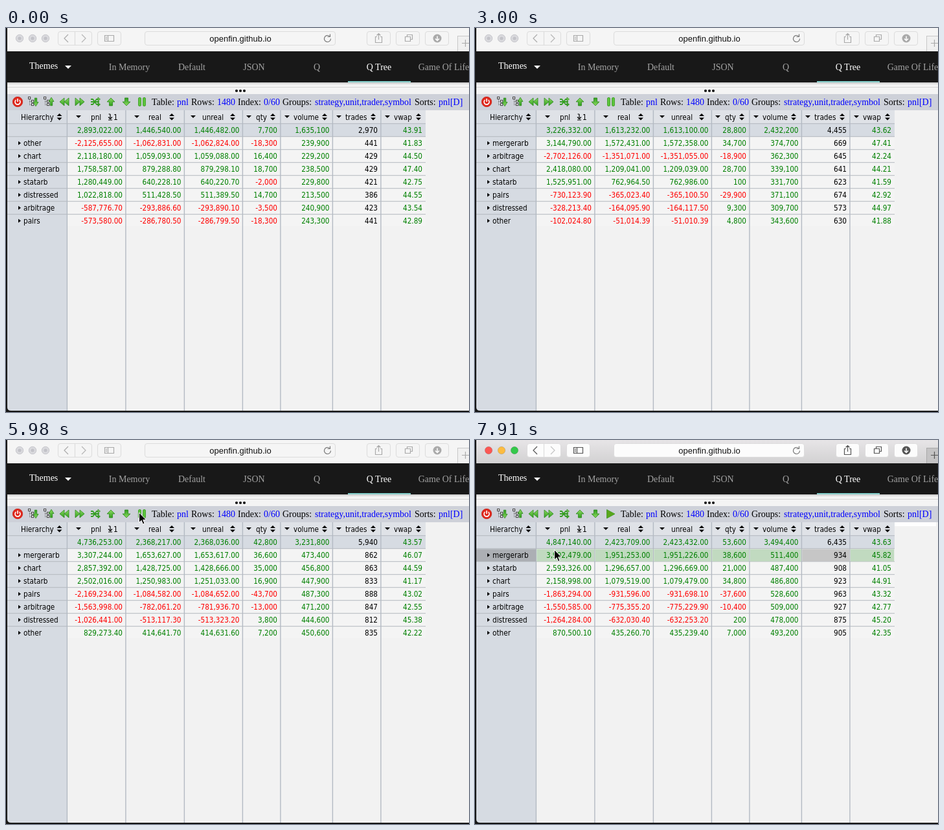
An HTML page that plays this animation: 715x593 px, repeating every 8 s.

```html
<!DOCTYPE html>
<html lang="en">
<head>
<meta charset="utf-8">
<style>
html, body { margin: 0; width: 715px; height: 593px; overflow: hidden; background: #f2f2f2; }
svg { display: block; }
.grid { font: 11.67px "DejaVu Sans Condensed", "Noto Sans", sans-serif; fill: #000; }
.serif { font: 14px "Liberation Serif", serif; }
.url { font: 13px "Liberation Sans", sans-serif; fill: #111; }
.end { text-anchor: end; }
.mid { text-anchor: middle; }
.line { fill: none; stroke-width: 1.2; }
</style>
</head>
<body>
<svg id="stage" width="715" height="593" viewBox="0 0 715 593">
  <defs>
    <linearGradient id="bar" x2="0" y2="1"><stop stop-color="#e7e5e7"/><stop offset="1" stop-color="#d2d1d2"/></linearGradient>
    <linearGradient id="leaf" x2="0" y2="1"><stop stop-color="#8edb63"/><stop offset="1" stop-color="#2f9d1d"/></linearGradient>
    <linearGradient id="shade" x2="0" y2="1"><stop stop-color="#c9c9c9"/><stop offset="1" stop-color="#f4f4f4"/></linearGradient>
  </defs>
  <g id="chrome"></g>
  <g id="page"></g>
  <g id="rows" class="grid"></g>
  <g id="control"></g>
  <g id="pointer"></g>
  <path d="M0 0H2V586Q2 591 8 591H715V593H0Z" fill="#161616"/>
</svg>
<script>
const LOOP = 8000;
const $ = id => document.getElementById(id);
const rect = (x, y, w, h, fill, more = '') =>
  `<rect x="${x}" y="${y}" width="${w}" height="${h}" fill="${fill}" ${more}/>`;
const path = (d, more = '') => `<path d="${d}" ${more}/>`;
const text = (x, y, s, more = '') => `<text x="${x}" y="${y}" ${more}>${s}</text>`;

const columns = [
  { name: 'pnl', left: 94.5, right: 185, menu: 112, label: 131 },
  { name: 'real', left: 185, right: 275.5, menu: 202, label: 220, sort: 256 },
  { name: 'unreal', left: 275.5, right: 365.5, menu: 289, label: 303, sort: 350 },
  { name: 'qty', left: 365.5, right: 424, menu: 375, label: 386, sort: 412 },
  { name: 'volume', left: 424, right: 504.5, menu: 434, label: 444, sort: 492 },
  { name: 'trades', left: 504.5, right: 579, menu: 514, label: 524, sort: 567 },
  { name: 'vwap', left: 579, right: 648, menu: 589, label: 599, sort: 637 },
];

// Per group: name, real, unreal, qty/100, volume/100, trades, vwap
function book(time, vwap, source) {
  const groups = source.trim().split('\n').map(row => {
    const [name, ...cells] = row.trim().split(' ');
    const [real, unreal, qty, volume, trades, price] = cells.map(Number);
    return { name, real, unreal, qty: qty * 100, volume: volume * 100, trades, vwap: price };
  });
  return { time, vwap, groups };
}

function between(time, a, b) {
  const mean = (p, q) => (p + q) / 2;
  const groups = a.groups.map(g => {
    const h = b.groups.find(other => other.name === g.name);
    const mixed = { name: g.name };
    for (const key of ['real', 'unreal', 'qty', 'volume', 'trades', 'vwap']) mixed[key] = mean(g[key], h[key]);
    return mixed;
  });
  return { time, vwap: mean(a.vwap, b.vwap), groups };
}

const first = book(0, 43.91, `
  other -1062831 -1062824 -183 2399 441 41.83
  chart 1059092.8 1059087.6 164 2292 429 44.5
  mergerarb 879288.8 879298.1 187 2385 429 47.4
  statarb 640228.1 640220.7 -20 2298 421 42.75
  distressed 511428.5 511389.5 147 2135 386 44.55
  arbitrage -293886.6 -293890.1 -35 2409 423 43.54
  pairs -286780.5 -286799.5 -183 2433 441 42.89`);
const second = book(1050, 43.7, `
  mergerarb 1208266 1208235 274 2886 517 47.46
  other -887916.7 -887913.7 -85 2779 504 41.24
  chart 868419.3 868423.4 229 2599 492 44.37
  statarb 643253.3 643249.7 -9 2635 484 42.4
  arbitrage -561362.3 -561365.9 -91 2793 490 42.18
  distressed 384058.4 384036.9 141 2433 444 45.08
  pairs -357584.1 -357613.3 -196 2938 534 43.22`);
const third = book(3000, 43.62, `
  mergerarb 1572431.3 1572358.3 347 3747 669 47.41
  arbitrage -1351071 -1351055 -189 3623 645 42.24
  chart 1209041 1209039 287 3391 641 44.21
  statarb 762964.5 762986 1 3317 623 41.59
  pairs -365023.4 -365100.5 -299 3711 674 42.92
  distressed -164095.9 -164117.5 93 3097 573 44.97
  other -51014.39 -51010.39 48 3436 630 41.88`);
const fourth = book(4940, 43.65, `
  mergerarb 1979346.3 1979300.3 375 4423 799 46.58
  chart 1315592.7 1315597.7 329 4179 788 44.28
  statarb 1012165 1012190 101 4149 770 41.29
  arbitrage -858757.6 -858623.1 -118 4310 773 42.61
  pairs -653825.1 -653911.3 -380 4540 828 42.96
  other 465641.26 465615.68 105 4151 770 42.42
  distressed -462363.2 -462395.4 64 3880 717 45.46`);
const fifth = book(5980, 43.57, `
  mergerarb 1653627 1653617 366 4734 862 46.07
  chart 1428725.4 1428666.3 350 4568 863 44.59
  statarb 1250983 1251033 169 4479 833 41.17
  pairs -1084582 -1084652 -437 4873 888 43.02
  arbitrage -782061.2 -781936.7 -130 4712 847 42.55
  distressed -513117.3 -513323.22 38 4446 812 45.38
  other 414641.73 414631.64 72 4506 835 42.22`);
const sixth = book(7020, 43.63, `
  mergerarb 1951253.3 1951225.6 386 5114 934 45.82
  statarb 1296657.2 1296669 210 4874 908 41.05
  chart 1079519 1079479 348 4868 923 44.91
  pairs -931596 -931698.1 -376 5286 963 43.32
  arbitrage -775355.2 -775229.9 -104 5090 927 42.77
  distressed -632030.4 -632253.2 2 4780 875 45.2
  other 435260.7 435239.4 70 4932 905 42.35`);
const books = [first, second, between(1950, second, third), third,
  between(4050, third, fourth), fourth, fifth, sixth];

const moves = [
  { time: 0 },
  { time: 4800, x: 711, y: 132 },
  { time: 4940, x: 173, y: 40 },
  { time: 5090, x: 97, y: 61 },
  { time: 5240, x: 124, y: 103 },
  { time: 5390, x: 184, y: 108 },
  { time: 5540, x: 187, y: 108 },
  { time: 5690, x: 198, y: 111 },
  { time: 5830, x: 203, y: 111 },
  { time: 5980, x: 205.5, y: 112 },
  { time: 6130, x: 204.5, y: 112.5, hand: true },
  { time: 6720, x: 202.5, y: 114.5, hand: true },
  { time: 6870, x: 200.5, y: 113.5, hand: true },
  { time: 7760, x: 176, y: 144 },
  { time: 7910, x: 122.5, y: 169.5 },
];
const at = (list, t) => list.findLast(item => item.time <= t);

function format(value, name) {
  const digits = ['qty', 'volume', 'trades'].includes(name) ? 0 : 2;
  const unit = name === 'qty' || name === 'volume' ? 100 : 1;
  const shown = digits ? Number(value.toPrecision(7)) : Math.round(value / unit) * unit;
  return shown.toLocaleString('en-US', { minimumFractionDigits: digits, maximumFractionDigits: digits });
}

const drawCells = (row, y) => columns.map(({ name, right }) => {
  const fill = name === 'trades' ? '#000' : row[name] < 0 ? '#f00' : '#008000';
  return text(right - 5, y, format(row[name], name), `class="end" fill="${fill}"`);
}).join('');

function drawRows(data, hover) {
  const groups = data.groups.map(g => ({ ...g, pnl: g.real + g.unreal }))
    .sort((a, b) => Math.abs(b.pnl) - Math.abs(a.pnl));
  const total = { vwap: data.vwap };
  for (const { name } of columns.slice(0, 6)) total[name] = groups.reduce((sum, g) => sum + g[name], 0);
  let out = '';
  if (hover) {
    out += rect(2, 168.5, 92, 19, '#acafb4');
    for (const { name, left, right } of columns)
      out += rect(left + .8, 168.5, right - left - 1.5, 19, name === 'trades' ? '#c6c6c6' : '#c1dac0');
  }
  out += drawCells(total, 162);
  groups.forEach((g, i) => {
    const y = 182 + i * 20;
    out += path(`M19 ${y - 7.2}L23 ${y - 4.2}L19 ${y - 1.2}Z`) + text(27, y, g.name) + drawCells(g, y);
  });
  return out;
}

function drawChrome(active) {
  const ink = active ? '#555' : '#aaa';
  const edge = active ? '#dddcdd' : '#dcdcdc';
  const button = (x, w) => rect(x + .5, 5.5, w, 21, active ? '#fcfcfc' : '#f5f5f5', `rx="3.5" stroke="${edge}"`);
  const icon = (d, color = ink) => path(d, `class="line" stroke="${color}"`);
  let out = rect(0, 0, 715, 36, active ? 'url(#bar)' : '#f5f5f5');
  ['#fc5753', '#fdbc40', '#34c84a'].forEach((color, i) => {
    const x = 21 + i * 20;
    out += `<circle cx="${x}" cy="16" r="5.7" fill="${active ? color : '#dadade'}" stroke="${active ? '#0002' : '#c6c6cb'}"/>`;
    if (!active) out += `<circle cx="${x}" cy="16" r="2.6" fill="#c2c2c8"/>`;
  });
  out += button(80, 52) + icon('M106.5 6V26', edge) + icon('M96 10L90 16L96 22')
    + icon('M117 10L123 16L117 22', active ? '#c4c4c4' : '#b5b5b5');
  out += button(141, 36) + icon('M152.5 11.5H166.5V20.5H152.5ZM157.5 11.5V20.5M154 14H156M154 16H156M154 18H156');
  out += button(214, 294) + text(362, 21, 'openfin.github.io', 'class="url mid"')
    + icon('M499.5 12.5A5 5 0 1 0 501.5 16.5M496.5 13.5H500.5V9.5', '#777');
  out += button(557, 36) + icon('M573 13.5H570.5V22.5H580.5V13.5H578M575.5 18V8.5M572.5 11.5L575.5 8.5L578.5 11.5');
  out += button(602, 36) + icon('M616.5 13.5H624.5V20.5H616.5ZM619.5 13V10.5H627.5V17.5H625');
  out += button(647, 36) + `<circle cx="666" cy="16" r="6.5" fill="${ink}"/>`
    + path('M666 12.5V19M663 16.5L666 19.5L669 16.5', 'fill="none" stroke="#fff" stroke-width="1.5"');
  out += rect(697.5, 12.5, 20, 24, active ? '#c4c3c4' : '#f0f0f0', `stroke="${active ? '#aaa' : '#c8c8c8'}"`)
    + icon('M704 23.5H715M709.5 18V29');
  return out;
}

function drawNav() {
  let out = rect(0, 36, 715, 48, '#181818') + rect(528, 82, 97, 2, '#86d0cc');
  out += text(36, 63, 'Themes', 'class="serif" fill="#fff"') + path('M91 58H101L96 63Z', 'fill="#fff"');
  const tabs = [['In Memory', 190.5], ['Default', 287], ['JSON', 383], ['Q', 480], ['Q Tree', 576], ['Game Of Life', 676]];
  for (const [name, x] of tabs)
    out += text(x, 65, name, `class="serif mid" fill="${name === 'Q Tree' ? '#fff' : '#a3a3a3'}"`);
  out += rect(2, 84, 713, 18, '#f4f4f4') + rect(2, 84, 713, 4, 'url(#shade)') + rect(2, 91, 713, 1, '#d5d5d5');
  for (const x of [356, 362, 368]) out += `<circle cx="${x}" cy="97" r="2.1" fill="#111"/>`;
  return out;
}

function drawToolbar() {
  const green = (d, more = '') => path(d, `fill="url(#leaf)" stroke="#2b8a1c" stroke-width=".8" ${more}`);
  const arrow = (x, y, w, h, flip = 1) =>
    green(`M0 ${-h}L${w} 0H${w * .42}V${h}H${-w * .42}V0H${-w}Z`, `transform="translate(${x} ${y}) scale(1 ${flip})"`);
  const tree = x => path(`M${x} 108V119M${x} 113.5H${x + 3}M${x} 118.5H${x + 3}`, 'fill="none" stroke="#666" stroke-dasharray="1 1"')
    + [[-2, 106.5], [3, 111.5], [3, 116.5]].map(([dx, y]) =>
      rect(x + dx, y, 3.2, 3.2, '#eee', 'stroke="#333" stroke-width=".9"')).join('');
  let out = rect(2, 102, 713, 25, '#ced1d9');
  out += '<circle cx="18" cy="114" r="7.7" fill="#e0281d" stroke="#c5241a" stroke-width=".8"/>'
    + path('M15.5 111A4 4 0 1 0 20.5 111M18 109V114', 'fill="none" stroke="#fff" stroke-width="1.6"');
  out += tree(36.5) + arrow(46, 114.5, 4, 6.3, -1) + tree(60.5) + arrow(70, 113.5, 4, 6.3);
  out += green('M90 108V120L83 114ZM97 108V120L90 114Z') + green('M107 108V120L114 114ZM114 108V120L121 114Z');
  out += path('M131 110H134L140 118H144M131 118H134L140 110H144M131 114H144', 'fill="none" stroke="#379f25" stroke-width="1.8"')
    + green('M142 107L145.5 110L142 113ZM142 115L145.5 118L142 121Z');
  out += arrow(162, 114, 6, 6) + arrow(186, 114, 6, 6, -1);
  const words = [[225, 'Table:'], [264, 'pnl'], [286, 'Rows:'], [326, '1480'], [358, 'Index:'], [398, '0/60'],
    [427, 'Groups:'], [477, 'strategy,unit,trader,symbol'], [631, 'Sorts:'], [668, 'pnl[D]']];
  words.forEach(([x, s], i) => out += text(x, 119, s, `class="serif" fill="${i % 2 ? '#00f' : '#000'}"`));
  return out;
}

function drawTable() {
  const sorter = x => path(`M${x - 4} 136L${x} 132L${x + 4} 136ZM${x - 4} 138.5L${x} 142.5L${x + 4} 138.5Z`);
  let out = rect(0, 127, 715, 466, '#f2f2f2') + rect(2, 127, 646, 41, '#d6dbe2')
    + rect(95, 127, 553, 20.5, '#dfe2e7') + rect(2, 127, 92.5, 466, '#d6dbe2') + rect(95, 168, 553, 138, '#f4f4f4');
  for (let y = 147; y < 300; y += 20) out += rect(2, y + .2, 646, 1, '#b3b8bf');
  for (const { left } of columns) out += rect(left - .8, 127, 1.4, 464, '#b4bac3');
  out += '<g class="grid">' + text(23, 142, 'Hierarchy') + sorter(82.5);
  for (const { name, menu, label, sort } of columns) {
    out += path(`M${menu - 4} 135H${menu + 4}L${menu} 139Z`) + text(label, 142, name);
    if (sort) out += sorter(sort);
  }
  out += path('M161 133V140M158 137.5L161 140.5L164 137.5M158 142H164M158.5 133H161', 'fill="none" stroke="#000" stroke-width="1.2"')
    + text(166, 142, '1');
  return out + '</g>';
}

function drawControl(playing) {
  if (playing) return path('M203.5 107.5L216 114.2L203.5 121Z', 'fill="#5aa61c" stroke="#3a9a22" stroke-width=".8"');
  return [204.5, 211.5].map(x =>
    rect(x, 107.5, 4, 13, '#5cc43c', 'rx="1.5" stroke="#3a9a22" stroke-width=".8"')).join('');
}

function drawPointer({ x, y, hand }) {
  if (x === undefined) return '';
  const shape = hand
    ? path('M5 11V2.5Q6.2 .5 7.5 2.5V8Q9 6.5 10 8.3Q11.5 7.3 12.3 9Q14.5 8.5 14.5 11V14L13 18H5.5L1 11.5Q1.5 9.3 3.5 10.2ZM7.5 8V11M10 8.5V11.5M12.3 9V12', 'fill="#fff" stroke="#000" stroke-width="1.1"')
    : path('M0 0V15.5L3.6 12.2L6 18L8.5 17L6.2 11.3H11Z', 'fill="#000" stroke="#fff" stroke-width="1"');
  return `<g transform="translate(${x} ${y})">${shape}</g>`;
}

const cache = {};
function put(id, key, draw) {
  if (cache[id] === key) return;
  cache[id] = key;
  $(id).innerHTML = draw();
}

function render(t) {
  const data = at(books, t), pointer = at(moves, t);
  const active = t >= 6420, cleared = t >= 6570, playing = t >= 7320, hover = t >= 7910;
  put('chrome', active, () => drawChrome(active));
  put('page', cleared, () => drawNav() + drawToolbar() + drawTable() + (cleared ? rect(648, 127, 64, 6, '#fff') : ''));
  put('rows', data.time + '/' + hover, () => drawRows(data, hover));
  put('control', playing, () => drawControl(playing));
  put('pointer', pointer.time, () => drawPointer(pointer));
}

const start = performance.now();
function tick() {
  render((performance.now() - start) % LOOP);
  requestAnimationFrame(tick);
}
tick();
</script>
</body>
</html>
```
